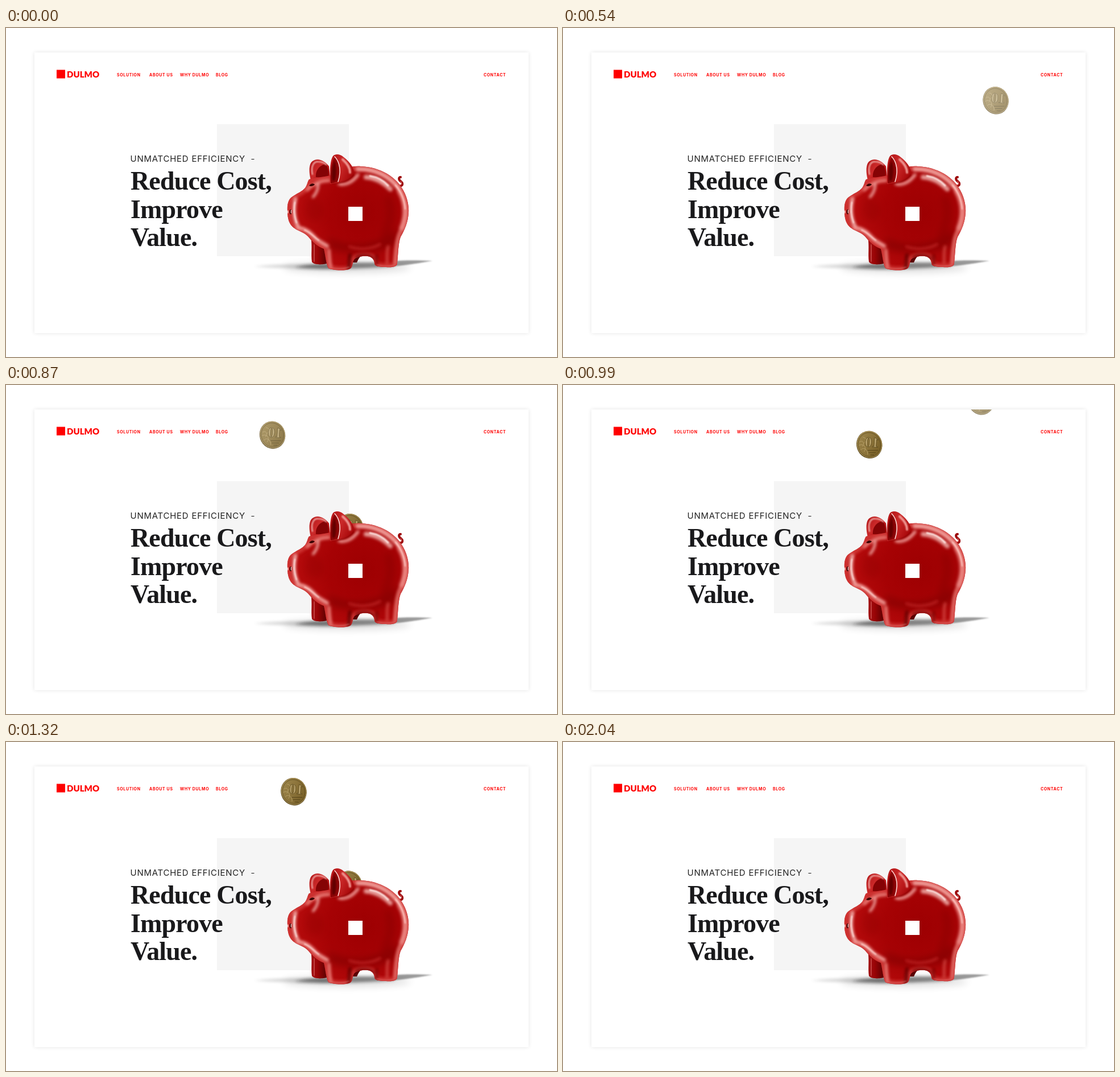
Animation of 969x578 px, one loop 2.7 s. Source, as an HTML page:

```html
<!DOCTYPE html>
<html lang="en">
<head>
<meta charset="utf-8">
<title>Piggy bank hero</title>
<style>
  html, body { margin: 0; width: 100%; height: 100%; overflow: hidden; background: #fff; }
  .card { position: absolute; left: 50px; top: 43px; width: 869px; height: 493px; background: #fff; box-shadow: 0 0 7px rgba(0, 0, 0, .11); }
  svg { position: absolute; left: 0; top: 0; display: block; }
  .nav { font: 700 7px Inter, sans-serif; letter-spacing: .65px; fill: #f00; }
  .brand { font: 900 15px Lato, sans-serif; fill: #f00; }
  .kicker { font: 400 15px Inter, sans-serif; letter-spacing: .74px; fill: #222; }
  .dash { font-size: 10px; font-weight: 600; }
  .title { font: 700 46px "Liberation Serif", "Times New Roman", serif; letter-spacing: -.85px; fill: #19191b; }
  .digits { font: 700 25px "Liberation Serif", serif; fill: #b7a069; stroke: #574519; stroke-width: .7; }
  .shine { fill: none; stroke-linecap: round; stroke-linejoin: round; }
</style>
</head>
<body>
<div class="card"></div>
<svg width="969" height="578" viewBox="0 0 969 578">
  <defs>
    <clipPath id="cardClip"><rect x="50" y="43" width="869" height="493"/></clipPath>

    <linearGradient id="gold" x1="0" y1="0" x2="1" y2="1">
      <stop offset="0" stop-color="#a18a50"/>
      <stop offset=".5" stop-color="#8b733a"/>
      <stop offset="1" stop-color="#70581f"/>
    </linearGradient>
    <radialGradient id="skin" gradientUnits="userSpaceOnUse" cx="630" cy="325" r="130">
      <stop offset="0" stop-color="#9d0002"/>
      <stop offset=".5" stop-color="#a60204"/>
      <stop offset="1" stop-color="#b80c0d"/>
    </radialGradient>
    <linearGradient id="earSkin" x1="0" y1="0" x2="1" y2=".6">
      <stop offset="0" stop-color="#b01012"/>
      <stop offset=".5" stop-color="#cb2a2a"/>
      <stop offset="1" stop-color="#a80709"/>
    </linearGradient>
    <linearGradient id="legSkin" x1="0" y1="0" x2="1" y2="0">
      <stop offset="0" stop-color="#a31214"/>
      <stop offset=".4" stop-color="#9a0406"/>
      <stop offset="1" stop-color="#550001"/>
    </linearGradient>

    <filter id="soft1" x="-50%" y="-50%" width="200%" height="200%"><feGaussianBlur stdDeviation="1"/></filter>
    <filter id="soft3" x="-50%" y="-50%" width="200%" height="200%"><feGaussianBlur stdDeviation="2.6"/></filter>
    <filter id="soft7" x="-50%" y="-80%" width="200%" height="260%"><feGaussianBlur stdDeviation="6.5"/></filter>

    <path id="body" d="M533 266 C545 262 565 262 580 256 C594 246 608 242 624 243
      C652 244 677 256 692 275 C703 289 709 307 708 324 C707 342 701 355 694 367
      C690 377 690 393 688 413 C688 419 681 421 668 420 C654 420 648 418 648 413
      C647 406 643 402 636 401 C627 400 616 402 612 407 C609 412 610 420 605 423
      C597 427 574 426 567 422 C563 416 562 400 559 388 C548 384 538 375 531 366
      C525 359 514 357 506 351 C498 345 495 335 495 322 C494 309 497 300 504 296
      C513 290 521 287 526 281 C530 276 530 270 533 266 Z"/>
    <clipPath id="bodyClip"><use href="#body"/></clipPath>

    <g id="coin">
      <g transform="rotate(-18)">
        <ellipse rx="22.6" ry="24.4" fill="#5d4a1e"/>
        <ellipse cx=".5" cy="-.5" rx="21.6" ry="23.3" fill="url(#gold)" stroke="#b7a069" stroke-width=".8"/>
        <ellipse rx="19.6" ry="21.4" fill="none" stroke="#5d4a1e" stroke-width=".7"/>
      </g>
      <g class="shine" stroke="#b7a069" stroke-width="1">
        <path d="M-17 -5 C-11 -9 -8 -2 -12 3 M-18 1 C-10 -3 -4 5 -9 12 M-15 9 C-10 3 -2 9 -3 17 M-11 -13 C-5 -13 -5 -6 -9 -3"/>
      </g>
      <text class="digits" transform="translate(4 4) rotate(4) scale(-1 1)" text-anchor="middle">10</text>
      <path class="shine" d="M-3 10 H15 M-1 14 H11 M2 18 H8" stroke="#544319" stroke-width="1"/>
    </g>
  </defs>

  <rect x="371" y="169" width="232" height="232" fill="#f5f5f5"/>

  <rect x="89" y="73.5" width="15" height="15" fill="#f00"/>
  <text class="brand" x="107" y="86.5">DULMO</text>
  <g class="nav">
    <text x="195" y="84.6">SOLUTION</text>
    <text x="252" y="84.6">ABOUT US</text>
    <text x="306" y="84.6">WHY DULMO</text>
    <text x="369" y="84.6">BLOG</text>
    <text x="840" y="84.6">CONTACT</text>
  </g>

  <text class="kicker" x="218.5" y="234.7">UNMATCHED EFFICIENCY <tspan class="dash" x="431.5" y="233.8">–</tspan></text>
  <g class="title">
    <text x="219" y="284">Reduce Cost,</text>
    <text x="219" y="334">Improve</text>
    <text x="219" y="383">Value.</text>
  </g>

  <g id="shadow">
    <ellipse cx="600" cy="421" rx="112" ry="9" fill="#000" opacity=".13" filter="url(#soft7)"/>
    <path d="M436 419 C480 415 520 414 565 416 L590 424 C540 425 490 422 436 419 Z" fill="#333" opacity=".2" filter="url(#soft3)"/>
    <path d="M660 414 C685 407 715 408 750 409 C725 413 705 417 675 419 Z" fill="#222" opacity=".45" filter="url(#soft1)"/>
    <path d="M508 420 C535 414 575 412 650 412 L686 418 C650 422 560 426 508 420 Z" fill="#1a1a1a" opacity=".5" filter="url(#soft3)"/>
  </g>

  <g id="coins" clip-path="url(#cardClip)"></g>

  <g id="pig">
    <!-- tail -->
    <path class="shine" d="M687 275 C696 281 700 274 695 270 C690 267 690 262 694 262" stroke="#9c0709" stroke-width="4"/>
    <path class="shine" d="M691 275 C696 277 697 272 694 269" stroke="#ee8a88" stroke-width="1"/>

    <!-- far legs -->
    <path d="M536 365 C539 385 536 398 538 411 C542 417 560 416 566 413 L566 375 Z" fill="url(#legSkin)"/>
    <path class="shine" d="M542 381 C543 393 541 402 542 410" stroke="#dc6a66" stroke-width="2" filter="url(#soft1)"/>
    <path d="M606 398 H628 C620 403 619 408 617 412 H607 Z" fill="#5a0002"/>

    <!-- far ear -->
    <path d="M536 267 C532 252 533 238 539 234 C548 227 561 233 568 243 L570 264 Z" fill="url(#earSkin)"/>
    <path d="M545 262 C544 251 550 242 562 239 C567 245 568 256 566 263 Z" fill="#850305"/>
    <path class="shine" d="M539 257 C536 243 541 234 549 235 C555 235 560 237 563 240" stroke="#f6b7b3" stroke-width="2.2" filter="url(#soft1)"/>

    <use href="#body" fill="url(#skin)"/>
    <g clip-path="url(#bodyClip)">
      <!-- rim light, then the shade inside it -->
      <use href="#body" class="shine" stroke="#d8433f" stroke-width="13" opacity=".72" filter="url(#soft3)"/>
      <g filter="url(#soft7)">
        <path d="M566 366 C595 388 650 386 690 352 L684 382 C650 394 610 398 570 388 Z" fill="#780003" opacity=".55"/>
        <path class="shine" d="M672 300 C680 324 676 344 666 362" stroke="#860103" stroke-width="12" opacity=".55"/>
        <path d="M528 300 C545 294 562 306 557 330 C548 344 533 340 526 328 Z" fill="#8c0204" opacity=".3"/>
      </g>
      <g class="shine" filter="url(#soft3)">
        <path d="M605 398 C603 404 605 414 602 423" stroke="#640002" stroke-width="5"/>
        <path d="M652 399 V416" stroke="#7a0103" stroke-width="4"/>
        <path d="M616 403 C626 398 640 399 646 405" stroke="#700103" stroke-width="4"/>
      </g>

      <!-- gloss -->
      <g class="shine" filter="url(#soft3)">
        <path d="M618 248 C650 247 676 261 692 284" stroke="#f3a5a0" stroke-width="7"/>
        <path d="M633 262 C650 263 664 271 676 283" stroke="#f6bcb7" stroke-width="8" opacity=".85"/>
        <path d="M692 286 C704 307 705 330 696 352" stroke="#ee8c87" stroke-width="9" opacity=".95"/>
        <path d="M694 356 C686 374 686 394 684 414" stroke="#e2706b" stroke-width="5"/>
        <path d="M509 300 C505 316 506 335 513 347" stroke="#f5b6b1" stroke-width="6"/>
        <path d="M513 351 C529 352 537 361 545 370 C552 376 559 379 565 383" stroke="#f3a09b" stroke-width="6"/>
        <path d="M530 284 C541 273 554 268 568 268" stroke="#e87a75" stroke-width="6"/>
        <path d="M540 297 C546 290 549 284 549 275" stroke="#f3b0ab" stroke-width="4"/>
        <path d="M586 274 C598 277 610 270 619 258" stroke="#f2a39e" stroke-width="5"/>
        <path d="M568 390 C569 401 569 411 571 420" stroke="#ea817c" stroke-width="5"/>
        <path d="M672 384 C669 394 671 405 670 414" stroke="#d34742" stroke-width="4"/>
        <path d="M604 384 C622 391 644 388 658 380" stroke="#d0302f" stroke-width="4" opacity=".7"/>
      </g>
      <g class="shine" filter="url(#soft1)">
        <path d="M508 306 C506 317 507 331 511 342" stroke="#ffe4e1" stroke-width="2"/>
        <path d="M640 260 C653 262 664 268 672 277" stroke="#ffe6e3" stroke-width="3"/>
        <path d="M525 355 C536 359 542 368 550 373" stroke="#ffd3cf" stroke-width="2"/>
        <path d="M685 276 C696 289 701 303 702 318" stroke="#ffcac5" stroke-width="2"/>
        <path d="M568 420 C577 424 595 424 603 420 M652 416 C663 419 677 419 684 416" stroke="#e07772" stroke-width="1.2"/>
      </g>
    </g>

    <!-- near ear -->
    <path d="M570 274 C569 252 570 232 575 225 C580 220 588 222 594 227 C606 236 613 247 612 258 C606 267 591 273 570 274 Z" fill="url(#earSkin)"/>
    <path d="M571 273 C570 254 572 236 578 227 C588 235 590 257 583 270 Z" fill="#8b0305"/>
    <path d="M574 268 C572 253 574 242 578 234 C582 247 581 260 578 268 Z" fill="#640002" filter="url(#soft1)"/>
    <path class="shine" d="M578 226 C587 235 590 252 584 270" stroke="#ffd9d6" stroke-width="1.6"/>
    <path class="shine" d="M592 231 C600 238 605 246 605 254" stroke="#f09a95" stroke-width="4" filter="url(#soft1)"/>
    <path class="shine" d="M573 273 C590 274 604 268 612 258" stroke="#8a0406" stroke-width="1.5" filter="url(#soft1)"/>

    <!-- eye and nostrils -->
    <path d="M533 277 C537 272 541 273 543 275 C540 278 536 279 533 277 Z" fill="#3a0001"/>
    <ellipse cx="500.5" cy="323" rx="2" ry="4.2" fill="#4b0002"/>
    <path class="shine" d="M501.5 320 V325 M496 321 V325" stroke="#ffe4e1" stroke-width="1.2"/>

    <rect x="602" y="314" width="25" height="25" fill="#fff"/>
  </g>
</svg>
<script>
  const LOOP = 2700, STEP = 30, FLIGHT = 480, FADE = 180;

  // Each toss eases sideways from x0 to x1 while y follows y0 - lift*s + drop*s^3.
  const tosses = [
    { start: 420,  x0: 788, x1: 604, y0: 125, lift: 0,   drop: 152 },
    { start: 720,  x0: 427, x1: 614, y0: 105, lift: 79,  drop: 249 },
    { start: 870,  x0: 758, x1: 602, y0: 24,  lift: 0,   drop: 275 },
    { start: 1080, x0: 386, x1: 626, y0: 95,  lift: 110, drop: 378 }
  ];

  const layer = document.getElementById("coins");
  for (const toss of tosses) {
    toss.node = document.createElementNS(layer.namespaceURI, "use");
    toss.node.setAttribute("href", "#coin");
    layer.append(toss.node);
  }

  const easeSine = s => (1 - Math.cos(Math.PI * s)) / 2;

  function place({ node, start, x0, x1, y0, lift, drop }, time) {
    const age = time - start;
    const s = age / FLIGHT;
    const flying = s > 0 && s < 1;
    node.setAttribute("visibility", flying ? "visible" : "hidden");
    if (!flying) return;
    const x = x0 + (x1 - x0) * easeSine(s);
    const y = y0 - lift * s + drop * s ** 3;
    node.setAttribute("transform", `translate(${x.toFixed(2)} ${y.toFixed(2)})`);
    node.setAttribute("opacity", Math.min(1, age / FADE));
  }

  const origin = performance.now();
  function draw() {
    const elapsed = (performance.now() - origin) % LOOP;
    const time = Math.floor(elapsed / STEP) * STEP;
    tosses.forEach(toss => place(toss, time));
    requestAnimationFrame(draw);
  }
  draw();
</script>
</body>
</html>
```
